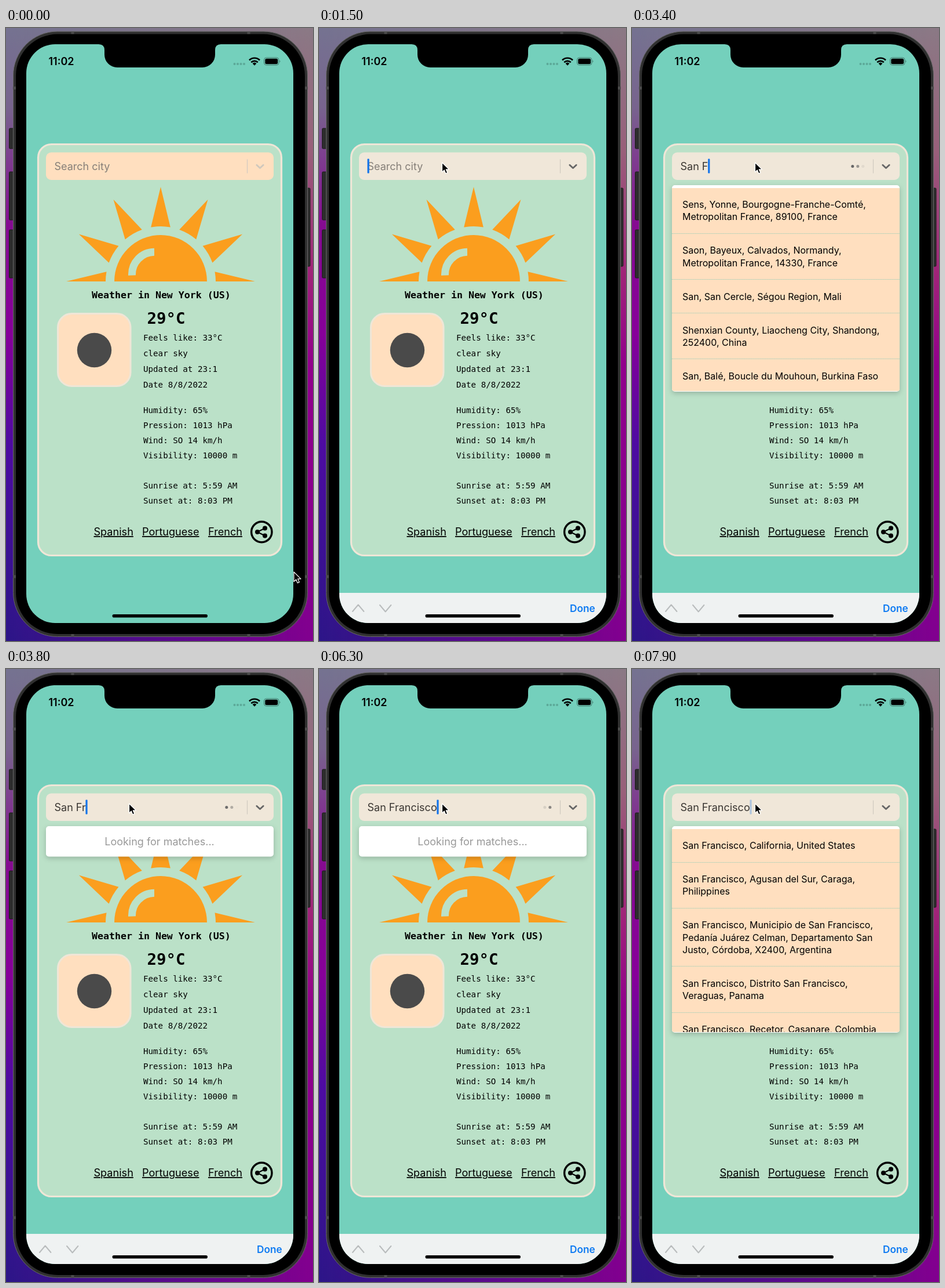
These frames come from a looping animation (530 px wide and 1057 px high, 8000 ms). An HTML page:

```html
<!DOCTYPE html>
<html lang="en">
<head>
<meta charset="utf-8">
<title>Weather search</title>
<style>
  html, body { margin: 0; width: 100%; height: 100%; overflow: hidden; background: #000; }
  svg { display: block; width: 100vw; height: 100vh; }
  text { font: 18px Inter, sans-serif; white-space: pre; }
  .mono text { font: 14.2px "DejaVu Sans Mono", monospace; }
  .mono .title { font-size: 16.6px; font-weight: 700; }
  .mono .temp { font-size: 27.4px; font-weight: 700; }
  .links text { font-size: 18.1px; text-decoration: underline; text-decoration-thickness: 1.3px; }
  .options text { font-size: 16px; }
  .menu { filter: drop-shadow(0 3px 4px rgba(0, 0, 0, .2)); }
  .line { fill: none; stroke-linecap: round; stroke-linejoin: round; }
</style>
</head>
<body>
<svg viewBox="0 0 530 1057" preserveAspectRatio="none">
  <defs>
    <linearGradient id="leftSide" x2="0" y2="1">
      <stop offset="0" stop-color="#757391"/>
      <stop offset=".13" stop-color="#78648f"/>
      <stop offset=".32" stop-color="#860b92"/>
      <stop offset=".5" stop-color="#87009a"/>
      <stop offset=".68" stop-color="#4d0ca2"/>
      <stop offset="1" stop-color="#2c1688"/>
    </linearGradient>
    <linearGradient id="rightSide" x2="0" y2="1">
      <stop offset="0" stop-color="#8b7985"/>
      <stop offset=".2" stop-color="#99607a"/>
      <stop offset=".4" stop-color="#a02478"/>
      <stop offset=".55" stop-color="#92008c"/>
      <stop offset="1" stop-color="#82008f"/>
    </linearGradient>
    <linearGradient id="across"><stop stop-color="#000"/><stop offset="1" stop-color="#fff"/></linearGradient>
    <mask id="blend"><rect width="530" height="1057" fill="url(#across)"/></mask>
    <clipPath id="screen"><rect x="35" y="28" width="461" height="998" rx="50"/></clipPath>
    <clipPath id="horizon"><rect x="-170" y="-170" width="340" height="170"/></clipPath>
    <clipPath id="listArea"><path d="M69 276H462V622a4 4 0 0 1-4 4H73a4 4 0 0 1-4-4Z"/></clipPath>
  </defs>

  <rect width="530" height="1057" fill="url(#leftSide)"/>
  <rect width="530" height="1057" fill="url(#rightSide)" mask="url(#blend)"/>

  <!-- phone -->
  <g fill="#2d2d2d" stroke="#1b1b1b">
    <rect x="5.5" y="173" width="8" height="35" rx="1.5"/>
    <rect x="5.5" y="248" width="8" height="83" rx="1.5"/>
    <rect x="5.5" y="348" width="8" height="83" rx="1.5"/>
    <rect x="518" y="276" width="7" height="135" rx="1.5"/>
  </g>
  <rect x="12.5" y="6" width="508" height="1043.500" rx="76" fill="#303030" stroke="#686868"/>
  <path d="M12 103.500h6M12 946h6M515 103.500h6M515 946h6M115 6v5M115 1045v5M419 6v5M419 1045v5" stroke="#4c4c4c" stroke-width="5"/>
  <rect x="17" y="10.500" width="499" height="1034.500" rx="72"/>
  <g clip-path="url(#screen)">
    <rect x="35" y="28" width="461" height="998" fill="#74d0bc"/>
    <g id="toolbar">
      <rect x="35" y="974" width="461" height="53" fill="#eff2f2"/>
      <path class="line" d="M58 1006l9.700-11.500 9.700 11.500M105 995l9.700 11.500 9.700-11.500" stroke="#b9bcbd" stroke-width="2"/>
      <text x="433" y="1007" fill="#0f7bf2" style="font-size:17.300px;font-weight:600">Done</text>
    </g>
    <rect x="183.500" y="1011" width="164.500" height="5.600" rx="2.800"/>
    <path d="M160 27H371V28Q361 28 361 38V46a22 22 0 0 1-22 22H192a22 22 0 0 1-22-22V38Q170 28 160 28Z"/>
  </g>

  <!-- status bar -->
  <text x="73.500" y="64" style="font-weight:600">11:02</text>
  <g fill="#5ca898">
    <circle cx="394.500" cy="62" r="2"/><circle cx="400" cy="62" r="2"/>
    <circle cx="405.500" cy="62" r="2"/><circle cx="411" cy="62" r="2"/>
  </g>
  <path fill="none" stroke="#000" stroke-width="2.700" d="M420 55.500a12.700 12.700 0 0 1 18 0M423.300 59.200a8 8 0 0 1 11.400 0"/>
  <path d="M425.600 61.200a5 5 0 0 1 6.800 0L429 64.800Z"/>
  <rect x="445.500" y="51" width="25.500" height="13" rx="4" fill="none" stroke="#43786d"/>
  <rect x="447.300" y="52.800" width="21.900" height="9.400" rx="2.500"/>
  <path d="M472.500 55.500q2 2 0 4Z" fill="#43786d"/>

  <!-- card -->
  <rect x="55.500" y="200.500" width="420" height="709" rx="23" fill="#bbe1c8" stroke="#efe6d7" stroke-width="3.200"/>
  <g transform="translate(267 437)" fill="#fb9e1e">
    <g id="rays" clip-path="url(#horizon)"></g>
    <path d="M-80 0a80 80 0 0 1 160 0Z"/>
    <path d="M-49.500-10.500A38.800 38.800 0 0 1-11-50.800" fill="none" stroke="#bbe1c8" stroke-width="13"/>
  </g>
  <rect x="89.500" y="492.500" width="125.500" height="125" rx="24" fill="#ffdfbf" stroke="#efe6d7" stroke-width="3"/>
  <circle cx="152.500" cy="555.500" r="29.700" fill="#4a4a4a"/>
  <g class="mono" id="report">
    <text class="title" x="148" y="466">Weather in New York (US)</text>
    <text class="temp" x="243.500" y="510">29°C</text>
  </g>
  <g class="links">
    <text x="151.500" y="875">Spanish</text>
    <text x="235" y="875">Portuguese</text>
    <text x="349" y="875">French</text>
  </g>
  <circle cx="441.300" cy="869" r="17.700" fill="none" stroke="#000" stroke-width="3.400"/>
  <path d="M447 862.500L434 869l13 6.500" fill="none" stroke="#000" stroke-width="2.200"/>
  <circle cx="434" cy="869" r="4"/><circle cx="447" cy="862.500" r="4"/><circle cx="447" cy="875.500" r="4"/>

  <!-- search field -->
  <rect id="field" x="69" y="214.500" width="393" height="47.500" rx="9"/>
  <path d="M416.500 226.500v24" stroke="#cfc9c0" stroke-width="1.200"/>
  <path class="line" id="chevron" d="M432.800 236.200l5.700 5.400 5.700-5.400" stroke-width="2.800"/>
  <text id="query" x="83.500" y="245"></text>
  <rect id="caret" y="225.500" width="3.200" height="25" rx="1" fill="#1474ea"/>
  <g id="dots" fill="#666">
    <circle cx="380.800" cy="238.500" r="2.500"/><circle cx="389.800" cy="238.500" r="2.500"/><circle cx="398.800" cy="238.500" r="2.500"/>
  </g>

  <g class="menu" id="waiting">
    <rect x="69" y="271" width="393" height="52.500" rx="5" fill="#fff"/>
    <text x="265" y="304" text-anchor="middle" fill="#999">Looking for matches...</text>
  </g>
  <g id="lists"></g>

  <path id="cursor" d="M0 0V16.500L3.800 13 6.300 18.900 9.300 17.600 6.800 11.900H12Z" stroke="#fff" stroke-width="1.200" stroke-linejoin="round"/>
</svg>
<script>
const $ = id => document.getElementById(id);
const NS = 'http://www.w3.org/2000/svg';
function add(parent, tag, attrs, text = '') {
  const node = document.createElementNS(NS, tag);
  for (const key in attrs) node.setAttribute(key, attrs[key]);
  node.textContent = text;
  return parent.appendChild(node);
}

for (let angle = -90; angle <= 90; angle += 30) {
  add($('rays'), 'path', { d: 'M0-163L16.800-93.500A95 95 0 0 0-16.800-93.500Z', transform: `rotate(${angle})` });
}

const report = [
  [538.5, 'Feels like: 33°C'], [566, 'clear sky'], [593, 'Updated at 23:1'], [620, 'Date 8/8/2022'],
  [664, 'Humidity: 65%'], [690, 'Pression: 1013 hPa'], [716, 'Wind: SO 14 km/h'], [742, 'Visibility: 10000 m'],
  [794, 'Sunrise at: 5:59 AM'], [820, 'Sunset at: 8:03 PM']
];
for (const [y, text] of report) add($('report'), 'text', { x: 237, y }, text);

// Each list is visible from start to end (ms); "|" breaks an option into lines.
const lists = [
  { start: 2000, end: 2950, options: [
    'Salzburg, 5020, Austria',
    'Tsu, Mie Prefecture, Japan',
    'Asha, Ашинское городское поселение,|Ashinsky District, Chelyabinsk Oblast, Ural|Federal District, Russia',
    'Si, Si Sa Ket Province, 43150, Thailand',
    'Gemeinde See, Bezirk Landeck, Tyrol, Austria', ''] },
  { start: 2950, end: 3500, options: [
    'Sens, Yonne, Bourgogne-Franche-Comté,|Metropolitan France, 89100, France',
    'Saon, Bayeux, Calvados, Normandy,|Metropolitan France, 14330, France',
    'San, San Cercle, Ségou Region, Mali',
    'Shenxian County, Liaocheng City, Shandong,|252400, China',
    'San, Balé, Boucle du Mouhoun, Burkina Faso'] },
  { start: 7400, end: 8000, options: [
    'San Francisco, California, United States',
    'San Francisco, Agusan del Sur, Caraga,|Philippines',
    'San Francisco, Municipio de San Francisco,|Pedanía Juárez Celman, Departamento San|Justo, Córdoba, X2400, Argentina',
    'San Francisco, Distrito San Francisco,|Veraguas, Panama',
    'San Francisco, Recetor, Casanare, Colombia'] }
];
const LINE = 21.25, PADDING = 36.7;

function buildList(list) {
  const menu = add($('lists'), 'g', { class: 'menu options' });
  add(menu, 'rect', { x: 69, y: 271, width: 393, height: 356, rx: 5, fill: '#fff' });
  const body = add(menu, 'g', { 'clip-path': 'url(#listArea)' });
  add(body, 'rect', { x: 69, y: 276, width: 393, height: 351, fill: '#ffdfbf' });
  let top = 275.8;
  for (const option of list.options) {
    const lines = option.split('|');
    lines.forEach((text, i) => add(body, 'text', { x: 87, y: top + 34.4 + i * LINE }, text));
    top += PADDING + lines.length * LINE;
    add(body, 'path', { d: `M69 ${Math.round(top) - .5}H462`, stroke: '#8ccbb5', 'stroke-dasharray': '1.2 1.2' });
  }
  list.node = menu;
}
lists.forEach(buildList);

const PHRASE = 'San Francisco';
const keyTimes = [1700, 2050, 2600, 2800, 3000, 3700, 4000, 4250, 4600, 4800, 4950, 5350, 5600];
const loads = [[1700, 2000], [2050, 2950], [3000, 3450], [3450, 7400]];
const FOCUS = 850;

const clamp = v => Math.max(0, Math.min(1, v));
const smooth = v => v * v * (3 - 2 * v);
const progress = (t, start, end) => smooth(clamp((t - start) / (end - start)));
const show = (node, on) => node.setAttribute('visibility', on ? 'visible' : 'hidden');
const within = (t, start, end) => t >= start && t < end;

function dotOpacity(age) {
  if (age < 0) return 1;
  return smooth(clamp(1 - Math.abs(age % 1000 - 400) / 400));
}

function caretOpacity(t) {
  if (t < FOCUS) return 0;
  if (t < 5830) return 1;
  const p = (t - 5830) % 1000;
  return p < 300 ? 1 - clamp(p / 100) : clamp((p - 300) / 150);
}

function render(t) {
  const focused = t >= FOCUS;
  const move = progress(t, 50, 620);
  $('cursor').setAttribute('transform', `translate(${497 - 284.500 * move} ${938 - 706 * move})`);
  $('toolbar').setAttribute('transform', `translate(0 ${53 * (1 - progress(t, FOCUS, 1200))})`);
  $('field').setAttribute('fill', focused ? '#f0e7d9' : '#ffdfbf');
  $('chevron').setAttribute('stroke', focused ? '#666' : '#cfc8bd');

  const typed = PHRASE.slice(0, keyTimes.filter(k => k <= t).length);
  const query = $('query');
  query.textContent = typed || 'Search city';
  query.setAttribute('fill', typed ? '#3a3632' : '#857f78');
  $('caret').setAttribute('x', 83.5 + (typed ? query.getComputedTextLength() - .3 : 0));
  $('caret').setAttribute('opacity', caretOpacity(t));

  const load = loads.find(([start, end]) => within(t, start, end));
  show($('dots'), load);
  if (load) [...$('dots').children].forEach((dot, i) => dot.setAttribute('opacity', dotOpacity(t - load[0] - i * 160)));

  show($('waiting'), within(t, 1700, 2000) || within(t, 3500, 7400));
  for (const list of lists) show(list.node, within(t, list.start, list.end));
}

let origin;
function tick(now) {
  origin ??= now;
  render((now - origin) % 8000);
  requestAnimationFrame(tick);
}
render(0);
requestAnimationFrame(tick);
</script>
</body>
</html>
```
